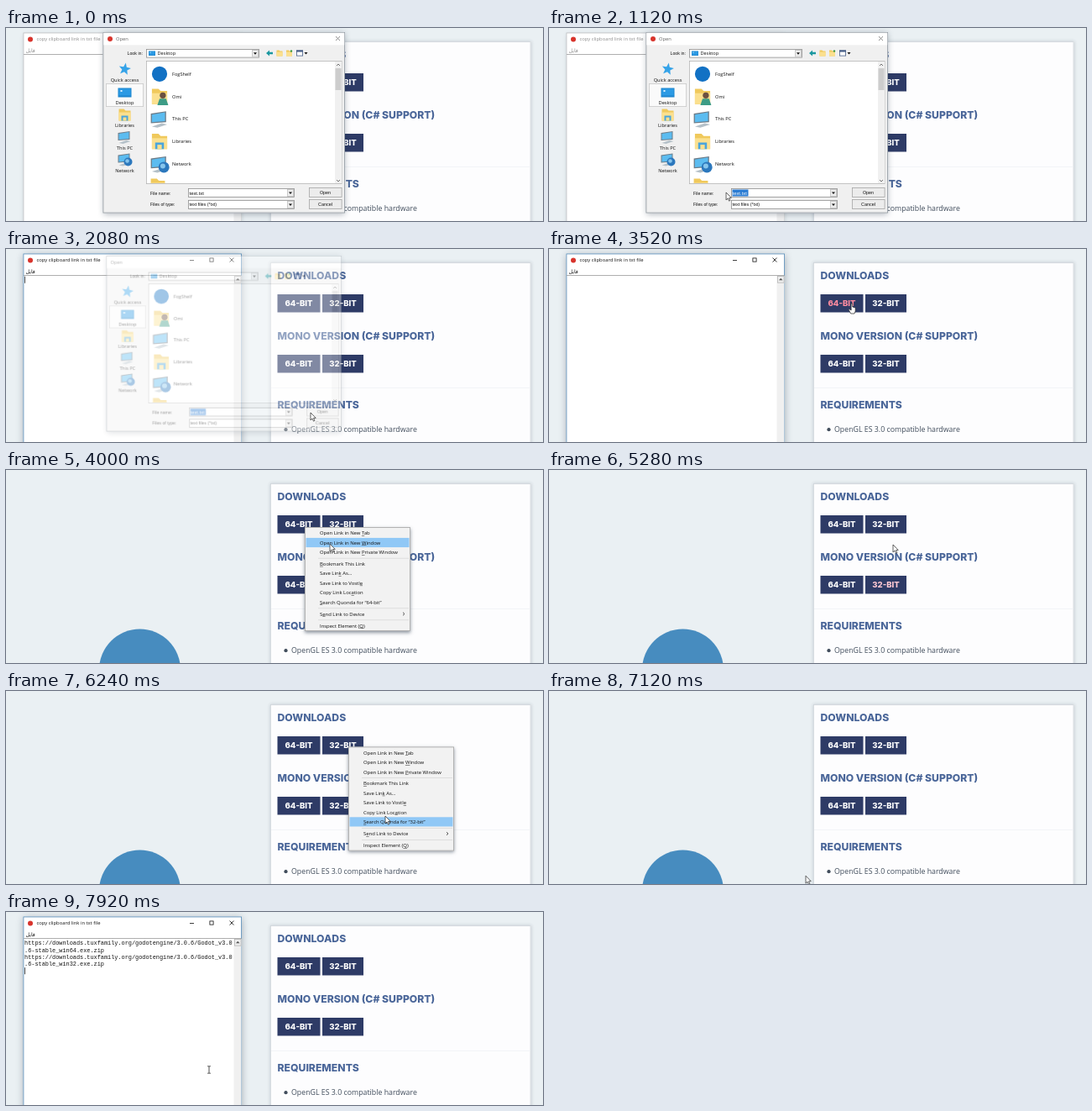
Recreate the animation shown at these times as an HTML page with a canvas. Size 640 by 230 pixels, loop 8 s.

```html
<!DOCTYPE html>
<html lang="en">
<head>
<meta charset="utf-8">
<style>
html, body { margin: 0; width: 100%; height: 100%; overflow: hidden; background: #eaf0f3; }
canvas { display: block; width: 640px; height: 230px; }
</style>
</head>
<body>
<canvas id="stage"></canvas>
<script>
const LOOP = 8000, STEP = 80;
const UI = '"Open Sans", "Noto Sans", sans-serif';
const DIALOG = '"Liberation Sans", sans-serif';
const HEAD = 'Inter, sans-serif';
const MONO = '"Liberation Mono", monospace';

const ratio = window.devicePixelRatio || 1;

function prepare(canvas) {
  canvas.width = 640 * ratio;
  canvas.height = 230 * ratio;
  const context = canvas.getContext('2d');
  context.scale(ratio, ratio);
  return context;
}

const stage = prepare(document.getElementById('stage'));
const layer = prepare(document.createElement('canvas'));
let c = stage;

const clamp = v => Math.max(0, Math.min(1, v));
const within = (t, from, to) => t >= from && t < to;

// ---------- drawing helpers ----------
function box(x, y, w, h, fill, stroke) {
  if (fill) { c.fillStyle = fill; c.fillRect(x, y, w, h); }
  if (stroke) {
    c.strokeStyle = stroke;
    c.lineWidth = 0.8;
    c.strokeRect(x + 0.4, y + 0.4, w - 0.8, h - 0.8);
  }
}

function shadowBox(x, y, w, h, fill, stroke, blur, alpha, dy = 0) {
  c.save();
  c.shadowColor = `rgba(30,45,65,${alpha})`;
  c.shadowBlur = blur * ratio;
  c.shadowOffsetY = dy * ratio;
  box(x, y, w, h, fill);
  c.restore();
  box(x, y, w, h, null, stroke);
}

function circle(x, y, r, fill) {
  c.beginPath();
  c.arc(x, y, r, 0, 7);
  c.fillStyle = fill;
  c.fill();
}

function shape(points, fill, stroke, width = 0.8) {
  c.beginPath();
  for (let i = 0; i < points.length; i += 2) c.lineTo(points[i], points[i + 1]);
  if (fill) { c.closePath(); c.fillStyle = fill; c.fill(); }
  if (stroke) { c.strokeStyle = stroke; c.lineWidth = width; c.stroke(); }
}

// y is the vertical middle of the capitals
function text(str, x, y, size, { font = UI, color = '#111', weight = 400, align = 'left' } = {}) {
  c.font = `${weight} ${size}px ${font}`;
  c.fillStyle = color;
  c.textAlign = align;
  c.fillText(str, x, y + size * 0.36);
}

// "_" underlines the next letter
function menuText(str, x, y, size) {
  const mark = str.indexOf('_');
  const plain = str.replace('_', '');
  text(plain, x, y, size);
  const start = c.measureText(plain.slice(0, mark)).width;
  box(x + start, y + 3, c.measureText(plain[mark]).width, 0.5, '#222');
}

const cross = (x, y, color) => {
  shape([x - 2.5, y - 2.5, x + 2.5, y + 2.5], null, color);
  shape([x + 2.5, y - 2.5, x - 2.5, y + 2.5], null, color);
};
const downArrow = (x, y) => shape([x - 2, y - 1, x + 2, y - 1, x, y + 1.5], '#111');

// ---------- web page ----------
const buttons = [
  { label: '64-BIT', x: 323.5, y: 54, w: 51, hover: [3160, 3660] },
  { label: '32-BIT', x: 377, y: 54, w: 49, hover: [5340, 5620] },
  { label: '64-BIT', x: 323.5, y: 126, w: 51, hover: [0, 0] },
  { label: '32-BIT', x: 377, y: 126, w: 49, hover: [5000, 5200] },
];

function drawPage(t) {
  box(0, 0, 640, 230, '#eaf0f3');
  circle(159.5, 238, 48.5, '#478cbf');
  shadowBox(315, 16, 310.5, 240, '#fdfdfe', '#ced4d9', 4, 0.2);
  const heading = { font: HEAD, weight: 800, color: '#4a6699' };
  text('DOWNLOADS', 323.5, 32, 12.2, heading);
  text('MONO VERSION (C# SUPPORT)', 323.5, 103.5, 12.2, heading);
  text('REQUIREMENTS', 323.5, 185.7, 12.2, heading);
  box(316, 165, 309, 0.8, '#f1f3f5');
  for (const b of buttons) {
    const [from, to] = b.hover;
    const pink = clamp((t - from) / 150) * clamp(1 - (t - to) / 150);
    box(b.x, b.y, b.w, 21.5, '#2e3b66');
    const color = `rgb(255,${255 - 115 * pink},${255 - 95 * pink})`;
    text(b.label, b.x + b.w / 2, b.y + 10.9, 9.6, { font: HEAD, weight: 800, align: 'center', color });
  }
  circle(333.5, 215.2, 2.1, '#414d5c');
  text('OpenGL ES 3.0 compatible hardware', 340, 215, 8.8, { color: '#414d5c' });
}

// ---------- text window ----------
const lines = ['64', '32'].flatMap(bits => [
  'https://downloads.tuxfamily.org/godotengine/3.0.6/Godot_v3.0',
  `.6-stable_win${bits}.exe.zip`,
]);

function drawWindow(t) {
  const active = t >= 2000, filled = t > 7000;
  shadowBox(20.5, 5.5, 260.5, 240, '#fff', active ? '#4f86b4' : '#b4b8bc', active ? 9 : 5, active ? 0.4 : 0.2, 1);
  circle(29, 13.5, 3, '#d8342c');
  const color = active ? '#111' : '#8d8d8d';
  text('copy clipboard link in txt file', 36.5, 13.3, 5.85, { color });
  box(219, 13, 5, 0.8, color);
  box(242.5, 10.5, 5, 5, null, color);
  cross(269, 13, color);
  text('فایل', 29.5, 26.5, 6.2, { font: '"DejaVu Sans", sans-serif', align: 'center', color });
  box(21, 31.2, 259.5, 0.8, '#9b9b9b');
  box(271.5, 32, 9, 198, '#f0f0f0');
  box(272, 32, 8.5, 8.5, '#eee', '#b5b5b5');
  shape([274, 37.2, 278.5, 37.2, 276.2, 34.8], '#555');
  if (filled) lines.forEach((line, i) => text(line, 22, 36.7 + i * 8.4, 6.89, { font: MONO }));
  const blinkOn = filled || (active && (t - 2000) % 900 < 600);
  if (blinkOn) box(22, filled ? 66.2 : 32.7, 0.8, 8, '#222');
}

// ---------- file dialog ----------
function folder(x, y, s = 1) {
  shape([x - 7 * s, y - 7 * s, x - 1 * s, y - 7 * s, x + 1 * s, y - 5 * s, x + 7 * s, y - 5 * s,
    x + 7 * s, y + 7 * s, x - 7 * s, y + 7 * s], '#f0c95c');
  box(x - 7 * s, y - 3 * s, 14 * s, 10 * s, '#fbe08f');
}

function library(x, y, s = 1) {
  folder(x, y, s);
  box(x - 4 * s, y + 1 * s, 8 * s, 6 * s, '#4aa5dc');
  box(x - 2 * s, y + 3 * s, 4 * s, 4 * s, '#fbe08f');
}

function computer(x, y, s = 1) {
  shape([x - 8 * s, y - 5 * s, x + 6 * s, y - 7 * s, x + 6 * s, y + 3 * s, x - 8 * s, y + 4 * s], '#6d7c88');
  shape([x - 7 * s, y - 4 * s, x + 5 * s, y - 6 * s, x + 5 * s, y + 2 * s, x - 7 * s, y + 3 * s], '#5cbcf0');
  shape([x - 7 * s, y + 7 * s, x + 2 * s, y + 4 * s, x + 7 * s, y + 5 * s, x - 2 * s, y + 8 * s], '#b4c0c8');
}

function network(x, y, s = 1) {
  computer(x, y, s);
  circle(x + 4 * s, y + 3 * s, 5 * s, '#2c78bd');
  circle(x + 3 * s, y + 2 * s, 2.3 * s, '#86c5ec');
}

function user(x, y, s = 1) {
  folder(x, y, s);
  circle(x + 3 * s, y - 1 * s, 2.8 * s, '#6b5040');
  shape([x - 2 * s, y + 8 * s, x, y + 2 * s, x + 6 * s, y + 2 * s, x + 8 * s, y + 8 * s], '#3d9c86');
}

function desktop(x, y, s = 1) {
  box(x - 8 * s, y - 5.5 * s, 16 * s, 11 * s, '#1d86cf');
  box(x - 7 * s, y - 4.5 * s, 14 * s, 8 * s, '#2b9ae4');
  box(x - 5 * s, y - 3 * s, 2 * s, 2 * s, '#d8f0ff');
}

function star(x, y) {
  const points = [];
  for (let i = 0; i < 10; i++) {
    const a = i * Math.PI / 5 - 1.4, r = i % 2 ? 3.2 : 7.5;
    points.push(x + r * Math.cos(a), y + r * Math.sin(a));
  }
  shape(points, '#35a3e8');
}

const cloudBadge = (x, y, s) => circle(x, y, 7 * s, '#1271c4');

const places = [
  ['Quick access', star, 49, 62], ['Desktop', desktop, 77, 89], ['Libraries', library, 103.5, 115.5],
  ['This PC', computer, 130, 142.5], ['Network', network, 156.5, 169.5],
];
const entries = [
  ['FogShelf', cloudBadge], ['Omi', user], ['This PC', computer], ['Libraries', library], ['Network', network],
];

function combo(x, y, w, h) {
  box(x, y, w, h, '#fff', '#8d8d8d');
  box(x + w - 9, y + 1, 8, h - 2, '#ececec', '#c2c2c2');
  downArrow(x + w - 5, y + h / 2);
}

function paintDialog(t, closing) {
  shadowBox(115.5, 5, 288.5, 215.5, '#f0f0f0', '#8f979f', 7, 0.35, 1);
  box(116.3, 5.8, 286.9, 14.5, '#fff');
  if (closing) {
    text('Open', 120.5, 13, 5.8, { color: '#555' });
  } else {
    circle(124, 13, 3, '#d8342c');
    text('Open', 131, 13, 5.8, { color: '#666' });
    cross(395.5, 12.5, '#777');
  }

  const label = { font: DIALOG };
  text('Look in:', 163, 30, 5.3, { font: DIALOG, align: 'right' });
  combo(167, 25, 135, 10.5);
  desktop(174, 30.2, 0.5);
  text('Desktop', 180.5, 30, 5.6);
  shape([310, 30, 314, 26.5, 314, 28.8, 318, 28.8, 318, 31.2, 314, 31.2, 314, 33.5], '#1b98a0');
  folder(326, 30, 0.5);
  folder(337.5, 30, 0.5);
  circle(340, 27.5, 1.2, '#3c9a45');
  box(346, 26.5, 8, 7, '#fff', '#445c86');
  box(346, 26.5, 8, 2, '#445c86');
  downArrow(357.5, 30);

  box(119, 66, 45, 28, '#fafafa', '#c9c9c9');
  for (const [name, icon, iconY, labelY] of places) {
    icon(141.5, iconY);
    text(name, 141.5, labelY, 5.7, { align: 'center' });
  }

  box(167, 39, 233.5, 147, '#fff', '#b4b4b4');
  c.save();
  c.beginPath();
  c.rect(168, 40, 223, 145);
  c.clip();
  entries.forEach(([name, icon], i) => {
    const y = 54.8 + i * 26.8;
    icon(183, y, 1.3);
    text(name, 198, y, 5.7);
  });
  folder(181, 188, 1.2);
  c.restore();
  box(392, 40, 8, 145, '#f0f0f0');
  box(392.5, 48, 7, 26, '#cdcdcd');
  shape([394, 45, 396, 43, 398, 45], null, '#555');
  shape([394, 181, 396, 183, 398, 181], null, '#555');

  text('File name:', 172, 196.7, 5.2, label);
  combo(217, 191, 127, 11);
  // selection grows leftwards while the pointer drags
  const selected = 19 * clamp((t - 480) / 240);
  box(237.5 - selected, 192.5, selected, 8, '#2a7bd2');
  text('text.txt', 218.5, 196.7, 5.9, { font: DIALOG, color: selected > 9 ? '#fff' : '#111' });
  text('Files of type:', 172, 210.2, 5.2, label);
  combo(217, 205, 127, 11);
  text('text files (*txt)', 218.5, 210.2, 5.4, label);
  const hot = t > 1600 && !closing;
  box(361, 190, 39.5, 12, hot ? '#e3f0fa' : '#ececec', hot ? '#3683c5' : '#a5a5a5');
  box(361, 204, 39.5, 12, '#ececec', '#a5a5a5');
  text('Open', 380.5, 196, 5.4, { font: DIALOG, align: 'center' });
  text('Cancel', 380.5, 210, 5.4, { font: DIALOG, align: 'center' });
}

// The dialog is painted on its own layer so that it fades as one piece
function drawDialog(t) {
  const closing = clamp((t - 1960) / 200);
  if (closing === 1) return;
  c = layer;
  c.clearRect(0, 0, 640, 230);
  paintDialog(t, closing);
  c = stage;
  c.save();
  c.globalAlpha = 1 - closing;
  const scale = 1 - 0.047 * closing;
  c.translate(259.5, 112.5);
  c.scale(scale, scale);
  c.drawImage(layer.canvas, -259.5, -112.5, 640, 230);
  c.restore();
}

// ---------- context menu ----------
const menuItems = bits => [
  ['Open Link in New _Tab', 7], ['Open Link in New _Window', 18.5], ['Open Link in New _Private Window', 30],
  ['_Bookmark This Link', 43.8], ['Save Lin_k As...', 55.2], ['Save Link to Vostl_e', 66.6],
  ['Copy Link Loc_ation', 78], ['_Search Quonda for “' + bits + '-bit”', 89.4],
  ['S_end Link to Device', 103.5], ['Inspect Element (_Q)', 117.5],
];

function drawMenu(x, y, bits, t) {
  shadowBox(x, y, 126, 124, '#f2f2f2', '#a3a3a3', 4, 0.5, 1.5);
  const pointer = pointerAt(t - 60);
  for (const [name, dy] of menuItems(bits)) {
    const row = y + dy;
    if (pointer.x > x + 2 && Math.abs(pointer.y - row) < 5.7) box(x + 1.5, row - 5.6, 123, 11.2, '#90c8f6');
    menuText(name, x + 18, row, 5.92);
  }
  for (const dy of [36.8, 96.5, 110.5]) box(x + 16, y + dy, 108, 0.7, '#d4d4d4');
  shape([x + 117, y + 101.7, x + 119, y + 103.5, x + 117, y + 105.3], null, '#333');
}

// ---------- pointer ----------
const path = [
  [80, 340, 125], [400, 240, 197], [480, 240, 197], [800, 206, 196], [1100, 206, 196],
  [1720, 363, 195], [2160, 363, 195], [2640, 375.5, 140], [2800, 375.5, 120], [3200, 361, 65],
  [3760, 361, 65], [4000, 386, 88], [4480, 408, 143], [4560, 408, 143], [4720, 409, 144],
  [5120, 409, 144], [5280, 410, 89], [5400, 408, 65], [5640, 408, 65], [5840, 428, 138],
  [6080, 450, 160], [6240, 452, 149], [6400, 452, 142], [6560, 452, 142], [6880, 420, 182],
  [7200, 268, 233], [7760, 268, 235], [7920, 242, 188],
];

function pointerAt(t) {
  const next = path.findIndex(p => p[0] > t);
  if (next < 1) {
    const [, x, y] = path[next < 0 ? path.length - 1 : 0];
    return { x, y };
  }
  const [t0, x0, y0] = path[next - 1], [t1, x1, y1] = path[next];
  const k = (t - t0) / (t1 - t0);
  return { x: x0 + (x1 - x0) * k, y: y0 + (y1 - y0) * k };
}

function drawPointer(t) {
  if (t < 80) return;
  const { x, y } = pointerAt(t);
  c.save();
  c.translate(x, y);
  if (within(t, 320, 880) || t >= 7760) {
    shape([0, -4, 0, 4], null, '#222');
    shape([-2, -4.2, 2, -4.2], null, '#222', 0.7);
    shape([-2, 4.2, 2, 4.2], null, '#222', 0.7);
  } else if (buttons.some(b => within(t, ...b.hover))) {
    shape([-0.9, 0, 0.7, 0, 0.8, 4, 4.2, 5, 4.2, 9, 3, 12, -1.3, 12, -3.8, 7.5, -3, 6.6, -0.9, 8, -0.9, 0],
      '#fff', '#222', 0.7);
  } else {
    shape([0, 0, 0, 9, 2, 7.1, 3.5, 10.2, 4.9, 9.5, 3.5, 6.6, 6.2, 6.4, 0, 0], '#fff', '#222', 0.7);
  }
  c.restore();
}

// ---------- main loop ----------
function draw(t) {
  drawPage(t);
  if (t < 3600 || t >= 7500) drawWindow(t);
  drawDialog(t);
  if (within(t, 3660, 5000)) drawMenu(356, 68, 64, t);
  if (within(t, 5620, 6520)) drawMenu(408, 66.5, 32, t);
  drawPointer(t);
}

const start = performance.now();
function frame() {
  const elapsed = (performance.now() - start) % LOOP;
  draw(Math.floor(elapsed / STEP) * STEP);
  requestAnimationFrame(frame);
}
frame();
</script>
</body>
</html>
```
